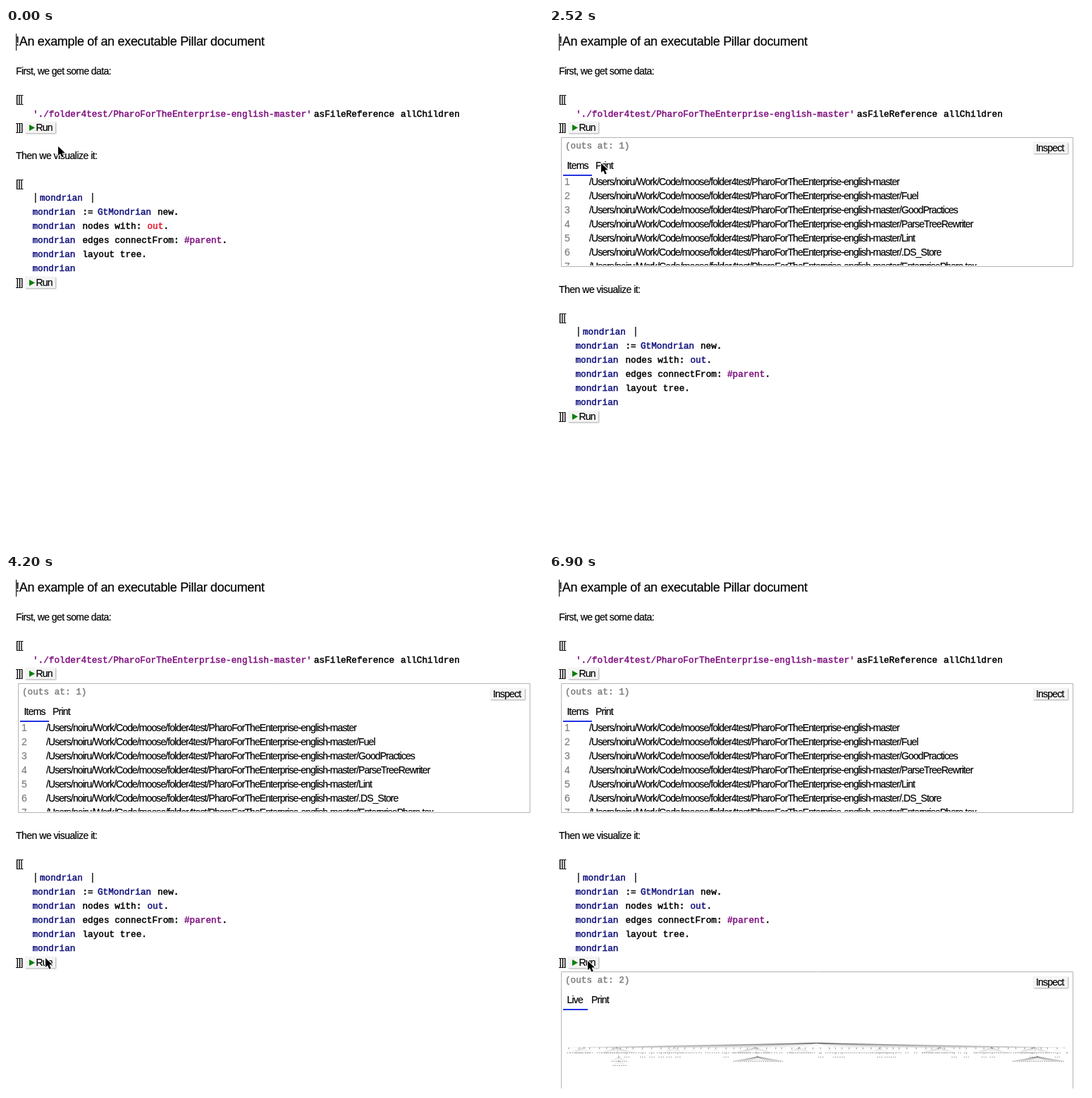
Recreate the animation shown at these times as an HTML page with a canvas. Size 762 by 735 pixels, loop 6960 ms.

```html
<!DOCTYPE html>
<html lang="en">
<head>
<meta charset="utf-8">
<title>Executable document</title>
<style>
html, body { margin: 0; width: 100%; height: 100%; overflow: hidden; background: #fff; }
canvas { display: block; }
</style>
</head>
<body>
<canvas id="stage" width="762" height="735"></canvas>
<script>
const ctx = document.getElementById('stage').getContext('2d');
const SANS = '"Liberation Sans", Arial, sans-serif';
const MONO = '"Liberation Mono", "Courier New", monospace';
const BLACK = '#000', NAVY = '#14147f', PURPLE = '#7f107f', RED = '#e6192d', GRAY = '#808080';
const LOOP = 6960, STEP = 60;
const FIRST_RUN = 1320, SECOND_RUN = 5160;
const ROOT = '/Users/noiru/Work/Code/moose/folder4test/PharoForTheEnterprise-english-master';
const FILES = ['', '/Fuel', '/GoodPractices', '/ParseTreeRewriter', '/Lint', '/.DS_Store', '/EnterprisePharo.tex'];

// Pointer rests: from, until, x, y. It glides between them.
const RESTS = [
  [0, 60, 74, 168],
  [720, 1500, 60, 142],
  [2160, 2940, 74, 192],
  [3600, 3780, 74, 463],
  [4260, LOOP, 55, 549]
];
// Times at which the caret is hidden.
const HIDDEN = [[1140, FIRST_RUN], [4800, SECOND_RUN]];

// Text with a fine outline, for a slightly heavier weight.
function write(str, x, y, color, font, spacing, outline) {
  ctx.font = font;
  ctx.letterSpacing = spacing + 'px';
  ctx.fillStyle = ctx.strokeStyle = color;
  ctx.lineWidth = outline;
  ctx.lineJoin = 'round';
  ctx.fillText(str, x, y);
  ctx.strokeText(str, x, y);
}

function text(str, x, y, color = BLACK, size = 14, spacing = -0.6) {
  write(str, x, y, color, `${size}px ${SANS}`, spacing, 0.2);
}

function code(str, x, y, color = BLACK) {
  write(str, x, y, color, `12.7px ${MONO}`, 0, 0.5);
}

function box(x, y, w, h, color) {
  ctx.fillStyle = color;
  ctx.fillRect(x, y, w, h);
}

function polygon(points, fill) {
  ctx.beginPath();
  points.forEach(([x, y]) => ctx.lineTo(x, y));
  ctx.closePath();
  ctx.fillStyle = fill;
  ctx.fill();
}

function line(x1, y1, x2, y2, color) {
  ctx.beginPath();
  ctx.moveTo(x1, y1);
  ctx.lineTo(x2, y2);
  ctx.strokeStyle = color;
  ctx.stroke();
}

function button(label, x, y, w, labelX) {
  ctx.save();
  ctx.shadowColor = 'rgba(0,0,0,.35)';
  ctx.shadowBlur = 2;
  ctx.shadowOffsetX = ctx.shadowOffsetY = 1;
  box(x, y, w, 16, '#f4f4f4');
  ctx.restore();
  text(label, labelX, y + 13, BLACK, 14, -0.8);
}

function runLine(y) {
  text(']]]', 14, y + 5);
  button('Run', 27, y - 8, 43, 42.5);
  polygon([[33, y - 4], [41, y + 0.5], [33, y + 5]], '#0a800a');
}

function pane(top, bottom, label, tab, tabEnd, printX) {
  ctx.lineWidth = 1;
  ctx.strokeStyle = '#b4b4b4';
  ctx.strokeRect(17.5, top + 0.5, 726, bottom - top);
  code(label, 23, top + 16, GRAY);
  button('Inspect', 687, top + 7, 49, 691);
  text(tab, 25.5, top + 45, BLACK, 14, -0.8);
  text('Print', printX, top + 45, BLACK, 14, -0.8);
  box(20, top + 53, tabEnd - 20, 2, '#2234e0');
}

function itemsPane() {
  pane(155, 338, '(outs at: 1)', 'Items', 61, 66);
  ctx.save();
  ctx.beginPath();
  ctx.rect(18, 210, 725, 127);
  ctx.clip();
  FILES.forEach((file, i) => {
    text(i + 1, 22, 223 + 20 * i, GRAY, 14, 0);
    text(ROOT + file, 57, 223 + 20 * i, BLACK, 14, -0.92);
  });
  ctx.restore();
}

function seeded(seed) {
  return () => (seed = (seed * 16807) % 2147483647) / 2147483647;
}

// One parent with a row of tiny leaves below it.
function fan(x, y, left, right, bottom, alpha) {
  for (let leaf = left; leaf <= right; leaf += 3) {
    line(x, y, leaf, bottom, `rgba(90,90,90,${alpha})`);
    box(leaf - 0.5, bottom, 1.5, 1, '#999');
  }
  box(x - 0.5, y - 0.5, 1, 1, '#777');
}

function tree() {
  const rand = seeded(41);
  ctx.lineWidth = 0.5;
  for (let x = 28; x <= 735; x += 8 + rand() * 7) {
    line(380, 665.5, x, 672, 'rgba(70,70,70,.16)');
    box(x - 0.5, 672, 1, 1, '#888');
    const half = 2 + rand() * 4;
    if (x < 725) fan(x, 673, Math.max(24, x - half), x + half, 679, 0.12);
    if (rand() < 0.35 && x < 725) fan(x, 680, x - 3, x + 3, 685, 0.1);
  }
  box(734, 679, 2, 1, '#777');
  box(379, 665, 2, 1, '#555');
  [[50, 30, 57], [96, 75, 120], [178, 165, 190], [293, 262, 318], [355, 338, 372],
   [470, 456, 482], [555, 530, 575], [628, 605, 650], [688, 662, 715]]
    .forEach(([x, left, right]) => fan(x, 672, left, right, 679, 0.2));
  line(293, 672, 296, 685, '#bbb');
  line(688, 672, 693, 685, '#bbb');
  line(96, 672, 99, 685, '#bbb');
  fan(296, 685, 262, 332, 691, 0.35);
  fan(693, 685, 658, 731, 691, 0.35);
  fan(99, 685, 89, 112, 691, 0.25);
  fan(99, 691, 91, 110, 697, 0.2);
}

function treePane() {
  ctx.save();
  ctx.beginPath();
  ctx.rect(0, 560, 762, 170);
  ctx.clip();
  pane(564, 760, '(outs at: 2)', 'Live', 55, 60);
  tree();
  ctx.restore();
}

function script(shift, bound) {
  const row = i => 245 + shift + 20 * i;
  text('Then we visualize it:', 14, 186 + shift, BLACK, 14, -0.5);
  text('[[[', 14, 226 + shift);
  text('|', 40, row(0));
  code('mondrian', 48, row(0), NAVY);
  text('|', 121, row(0));
  for (let i = 1; i < 6; i++) code('mondrian', 37.5, row(i), NAVY);
  code(':=', 108.5, row(1));
  code('GtMondrian', 130, row(1), NAVY);
  code('new.', 215, row(1));
  code('nodes with:', 108.5, row(2));
  code('out', 200.5, row(2), bound ? NAVY : RED);
  code('.', 223.5, row(2));
  code('edges connectFrom:', 108.5, row(3));
  code('#parent', 253, row(3), PURPLE);
  code('.', 306.5, row(3));
  code('layout tree.', 108.5, row(4));
  runLine(361 + shift);
}

function pointer(t) {
  let i = RESTS.length - 1;
  while (RESTS[i][0] > t) i--;
  const [, until, x, y] = RESTS[i];
  if (t <= until || i === RESTS.length - 1) return [x, y];
  const [next, , nx, ny] = RESTS[i + 1];
  const p = (t - until) / (next - until);
  const e = p * p * (3 - 2 * p);
  return [x + (nx - x) * e, y + (ny - y) * e];
}

function drawPointer(x, y) {
  ctx.save();
  ctx.translate(Math.round(x), Math.round(y));
  ctx.lineJoin = 'round';
  ctx.lineWidth = 2;
  ctx.strokeStyle = '#fff';
  const shape = [[0, 0], [0, 13], [3, 10.3], [5.3, 15.5], [7.8, 14.4], [5.5, 9.5], [9.8, 9.3]];
  polygon(shape, BLACK);
  ctx.stroke();
  polygon(shape, BLACK);
  ctx.restore();
}

function draw(t) {
  const ran = t >= FIRST_RUN;
  box(0, 0, 762, 735, '#fff');
  text('!An example of an executable Pillar document', 14, 24.5, BLACK, 18, -0.31);
  if (!HIDDEN.some(([from, to]) => t >= from && t < to)) box(14, 8, 1, 24, BLACK);
  text('First, we get some data:', 14, 66);
  text('[[[', 14, 106);
  code("'./folder4test/PharoForTheEnterprise-english-master'", 38, 125.5, PURPLE);
  code('asFileReference', 437, 125.5);
  code('allChildren', 560, 125.5);
  runLine(141);
  if (ran) itemsPane();
  script(ran ? 190 : 0, ran);
  if (t >= SECOND_RUN) treePane();
  drawPointer(...pointer(t));
}

const start = performance.now();
function tick() {
  const t = (performance.now() - start) % LOOP;
  draw(Math.floor(t / STEP) * STEP);
  requestAnimationFrame(tick);
}
tick();
</script>
</body>
</html>
```
